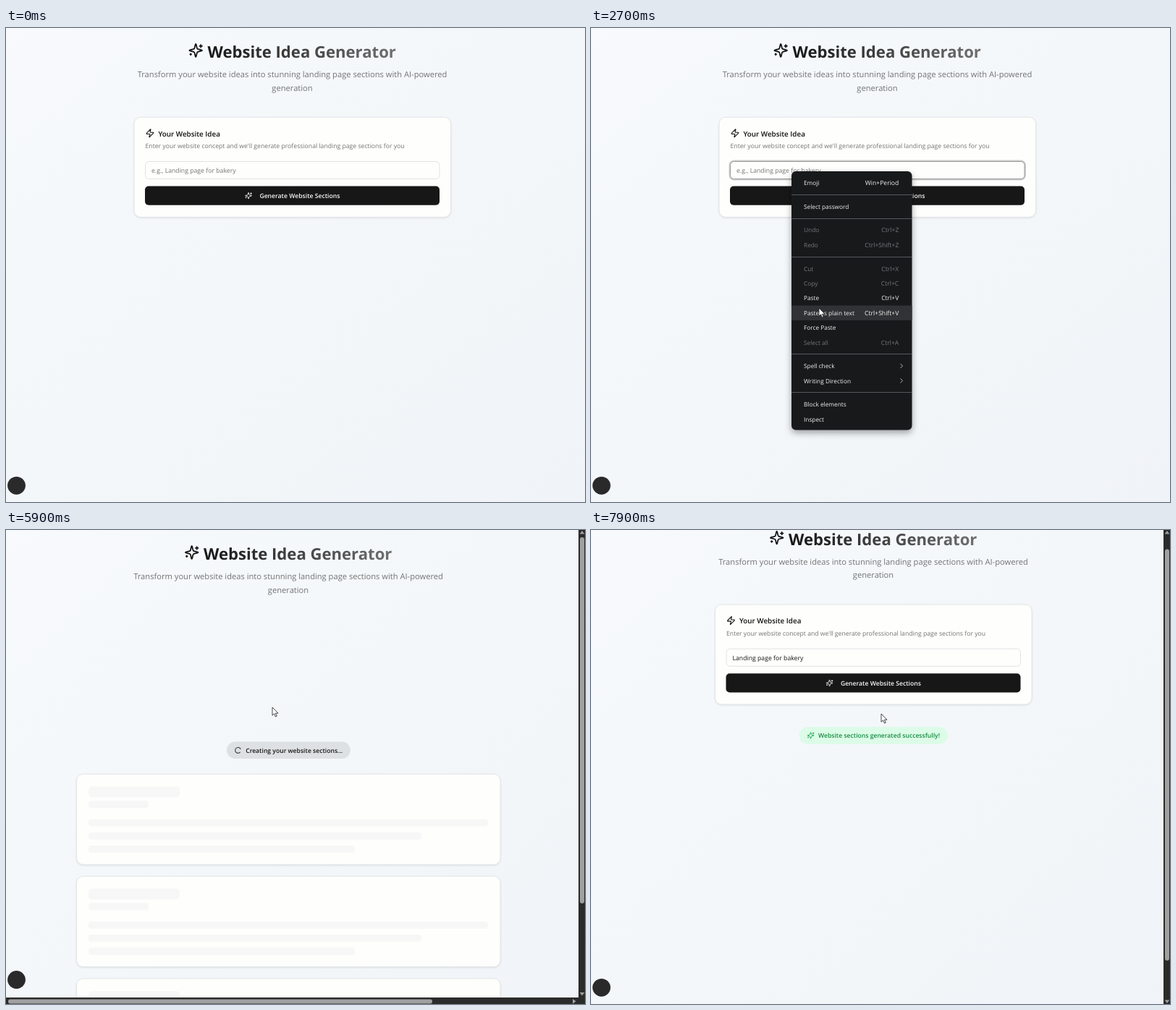
These frames come from a looping animation (800x655 px, 8000 ms). An HTML page:

```html
<!DOCTYPE html>
<html lang="en">
<head>
<meta charset="utf-8">
<title>Website Idea Generator</title>
<style>
  html, body { margin: 0; width: 100%; height: 100%; overflow: hidden; background: #f4f8fb; }
  svg { display: block; width: 100vw; height: 100vh; font-family: "Open Sans", "Noto Sans", sans-serif; }
  text { text-rendering: geometricPrecision; white-space: pre; }
  .icon { fill: none; stroke-width: 2; stroke-linecap: round; stroke-linejoin: round; }
  .card { fill: #fefefd; stroke: #e3e5e6; filter: drop-shadow(0 1px 1px rgba(0, 0, 0, .09)); }
  .menu { fill: #18191b; filter: drop-shadow(0 4px 5px rgba(0, 0, 0, .35)); }
</style>
</head>
<body>
<svg id="stage" viewBox="0 0 800 655" xmlns="http://www.w3.org/2000/svg"></svg>
<script>
const LOOP = 8000, STEP = 100;
const FOCUS = 1700, MENU_OPEN = 1900, PASTE = 3200, LOADING = 4800, DONE = 7500;
const SCROLL_START = 6100, SCROLL_END = 6800, SCROLL_MAX = 138.7;

const SPARKLES = 'M9.937 15.5A2 2 0 0 0 8.5 14.063l-6.135-1.582a.5.5 0 0 1 0-.962L8.5 9.936A2 2 0 0 0 9.937 8.5l1.582-6.135a.5.5 0 0 1 .963 0L14.063 8.5A2 2 0 0 0 15.5 9.937l6.135 1.581a.5.5 0 0 1 0 .964L15.5 14.063a2 2 0 0 0-1.437 1.437l-1.582 6.135a.5.5 0 0 1-.963 0zM20 3v4M22 5h-4M4 17v2M5 18H3';
const ZAP = 'M4 14a1 1 0 0 1-.78-1.63l9.9-10.2a.5.5 0 0 1 .86.46l-1.92 6.02A1 1 0 0 0 13 10h7a1 1 0 0 1 .78 1.63l-9.9 10.2a.5.5 0 0 1-.86-.46l1.92-6.02A1 1 0 0 0 11 14z';

const text = (x, y, size, fill, str, attrs = '') =>
  `<text x="${x}" y="${y}" font-size="${size}" fill="${fill}" ${attrs}>${str}</text>`;
const rect = (x, y, w, h, r, attrs) =>
  `<rect x="${x}" y="${y}" width="${w}" height="${h}" rx="${r}" ${attrs}/>`;
const icon = (x, y, size, path, color) =>
  `<path class="icon" transform="translate(${x} ${y}) scale(${size / 24})" stroke="${color}" d="${path}"/>`;
const SEMI = 'font-weight="600"', MIDDLE = 'text-anchor="middle"';

// Context menu: label, shortcut, enabled; null is a separator.
const MENU = [
  ['Emoji', 'Win+Period', 1], null,
  ['Select password', '', 1], null,
  ['Undo', 'Ctrl+Z', 0], ['Redo', 'Ctrl+Shift+Z', 0], null,
  ['Cut', 'Ctrl+X', 0], ['Copy', 'Ctrl+C', 0], ['Paste', 'Ctrl+V', 1],
  ['Paste as plain text', 'Ctrl+Shift+V', 1], ['Force Paste', '', 1], ['Select all', 'Ctrl+A', 0], null,
  ['Spell check', '›', 1], ['Writing Direction', '›', 1], null,
  ['Block elements', '', 1], ['Inspect', '', 1],
];
const ROW = 20.4, GAP = 12.3;
const menuRows = [];

function buildMenu() {
  let y = 214, out = '';
  for (const item of MENU) {
    if (!item) {
      const line = Math.floor(y - ROW / 2 + GAP / 2) + .5;
      out += `<path d="M277 ${line}h166.5" stroke="#56585b"/>`;
      y += GAP;
      continue;
    }
    const [label, keys, enabled] = item;
    const color = enabled ? '#f1f1f1' : '#76777a';
    out += text(294, y + 3, 8.3, color, label);
    out += keys === '›'
      ? `<path d="M427.5 ${y - 3.2}l3 3-3 3" fill="none" stroke="#b5b6b8"/>`
      : text(425.3, y + 3, 8.6, color, keys, 'text-anchor="end"');
    if (enabled) menuRows.push(y);
    y += ROW;
  }
  return rect(277, 198, 166.5, 357.5, 6, 'class="menu"') +
    rect(277, 0, 166.5, ROW, 0, 'id="menuHover" fill="#313235"') + out;
}

function skeleton(index) {
  const bars = [[17, 126, 15], [37, 83, 10], [62.3, 552, 10], [80.5, 460, 10], [98.6, 368, 10]];
  return `<g transform="translate(97.5 ${337.3 + index * 141.3})">` +
    rect(0, 0, 585.5, 125, 9, 'class="card"') + '<g class="pulse">' +
    bars.map(([y, w, h]) => rect(16.5, y, w, h, h > 12 ? 5 : 4, 'fill="#f2f2f3"')).join('') + '</g></g>';
}

const arrow = (x, y, dir) =>
  `<path transform="translate(${x} ${y}) rotate(${dir})" d="M-3.4 2L0-2.5 3.4 2z" fill="#a0a0a0"/>`;

document.getElementById('stage').innerHTML = `
<defs>
  <linearGradient id="sky" x1="0" y1="0" x2="1" y2="1">
    <stop stop-color="#f8fafd"/><stop offset=".3" stop-color="#f4f8fb"/>
    <stop offset=".65" stop-color="#f2f6f9"/><stop offset="1" stop-color="#f0f3f8"/>
  </linearGradient>
  <linearGradient id="ink" gradientUnits="userSpaceOnUse" x1="279" y1="0" x2="539" y2="0">
    <stop stop-color="#161616"/><stop offset="1" stop-color="#707070"/>
  </linearGradient>
</defs>
<g id="page">
  <rect id="backdrop" width="800" height="655" fill="url(#sky)"/>
  <g id="column">
    ${icon(251.7, 20.5, 21, SPARKLES, '#111')}
    ${text(278.5, 41, 22.1, 'url(#ink)', 'Website Idea Generator', 'font-weight="700"')}
    ${text(395.5, 68.3, 11.15, '#737373', 'Transform your website ideas into stunning landing page sections with AI-powered', MIDDLE)}
    ${text(395.5, 86.6, 11.15, '#737373', 'generation', MIDDLE)}
    <g id="form">
      ${rect(177, 123.3, 437.5, 138, 9, 'class="card"')}
      ${icon(192.4, 138.8, 13.1, ZAP, '#111')}
      ${text(210.4, 149.6, 9.85, '#111', 'Your Website Idea', SEMI)}
      ${text(192.5, 166, 8.67, '#737373', "Enter your website concept and we'll generate professional landing page sections for you")}
      ${rect(191.5, 183.5, 408.5, 26, 6, 'id="ring" fill="none" stroke="#cdcdcd" stroke-width="2"')}
      ${rect(192.5, 184.5, 406.5, 24, 5, 'id="input" fill="#fefefd"')}
      <text id="value" x="201" y="200" font-size="8.7"></text>
      ${rect(192, 218.6, 407, 26.2, 5, 'id="button"')}
      ${icon(329.8, 226.5, 10.5, SPARKLES, '#fafafa')}
      ${text(350.4, 235, 8.63, '#fafafa', 'Generate Website Sections', SEMI)}
    </g>
  </g>
  <g id="loading">
    ${rect(305, 292.6, 170.7, 23.4, 11.7, 'fill="#dee1e3"')}
    <path id="spinner" class="icon" stroke="#3c3c3c" style="stroke-width:2.5" d="M9 0A9 9 0 1 1 2.781-8.56"/>
    ${text(331.2, 307.7, 8.6, '#171717', 'Creating your website sections...', SEMI)}
    ${[0, 1, 2].map(skeleton).join('')}
  </g>
  <g id="success">
    ${rect(287.7, 292.6, 205, 23.4, 11.7, 'fill="#dcfce7"')}
    ${icon(298.3, 299, 10.5, SPARKLES, '#16a34a')}
    ${text(314, 307.8, 8.6, '#168a42', 'Website sections generated successfully!', SEMI)}
  </g>
</g>
<circle id="badge" cx="14.5" r="12.4" fill="#2a2a2b"/>
<g id="bars">
  ${rect(791, 0, 9, 655, 0, 'fill="#2b2b2b"')}
  ${arrow(796, 3.5, 0)}
  ${rect(793, 0, 6, 10, 3, 'id="thumb" fill="#a0a0a0"')}
  <g id="downArrow">${arrow(796, 0, 180)}</g>
  <g id="hbar">
    ${rect(0, 646, 800, 9, 0, 'fill="#2b2b2b"')}
    ${rect(3, 648.5, 586, 6, 3, 'fill="#a0a0a0"')}
    ${arrow(785, 651.3, 90)}
  </g>
</g>
<g id="menu">${buildMenu()}</g>
<path id="arrowCursor" d="M0 0V11.2L2.6 8.8 4.4 13 6.2 12.2 4.4 8.2H8Z" fill="#fff" stroke="#1c1c1c" stroke-width=".8"/>
<g id="beamCursor" fill="none">
  <path d="M-2.5-5.5H-1Q0-5.5 0-4.5V4.5Q0 5.5-1 5.5H-2.5M2.5-5.5H1Q0-5.5 0-4.5V4.5Q0 5.5 1 5.5H2.5" stroke="#111"/>
</g>`;

const ui = {};
document.querySelectorAll('[id]').forEach(el => ui[el.id] = el);
const pulses = document.querySelectorAll('.pulse');

const set = (el, attrs) => { for (const k in attrs) el.setAttribute(k, attrs[k]); };
const show = (el, on) => set(el, { visibility: on ? 'visible' : 'hidden' });
const clamp = v => Math.min(1, Math.max(0, v));
const ease = v => { v = clamp(v); return v * v * (3 - 2 * v); };

// Pointer stops: time, x, y.
const POINTER = [
  [100, 85, 228], [900, 311, 198], [1400, 311, 198], [1700, 277, 198], [1900, 277, 198],
  [2600, 315, 387], [2800, 315, 387], [3000, 313, 376], [3300, 313, 376], [3600, 309, 356],
  [4000, 287, 222], [4400, 325, 232], [4700, 325, 232], [5300, 368, 245], [5900, 368, 245], [6100, 401, 254],
];

function pointerAt(t) {
  const next = POINTER.findIndex(p => p[0] > t);
  if (next < 0) return POINTER[POINTER.length - 1].slice(1);
  if (next === 0) return POINTER[0].slice(1);
  const [t0, x0, y0] = POINTER[next - 1], [t1, x1, y1] = POINTER[next];
  const k = ease((t - t0) / (t1 - t0));
  return [x0 + (x1 - x0) * k, y0 + (y1 - y0) * k];
}

function drawForm(t, x, y, menuOpen) {
  const focused = t >= FOCUS && t < LOADING, filled = t >= PASTE;
  show(ui.ring, focused);
  set(ui.input, { stroke: focused ? '#999' : '#e2e3e4' });
  ui.value.textContent = filled ? 'Landing page for bakery' : 'e.g., Landing page for bakery';
  set(ui.value, { fill: filled ? '#141414' : '#737373' });
  const hover = t > 0 && t < LOADING && !menuOpen && x > 192 && x < 599 && y > 218.5 && y < 245;
  set(ui.button, { fill: hover ? '#2d2d2d' : '#171717' });
}

function drawPointer(t, x, y, menuOpen) {
  const beam = t < LOADING && !menuOpen && x > 192 && x < 599 && y > 184 && y < 209;
  show(ui.arrowCursor, t > 0 && !beam);
  show(ui.beamCursor, t > 0 && beam);
  set(ui.arrowCursor, { transform: `translate(${x} ${y})` });
  set(ui.beamCursor, { transform: `translate(${x + .7} ${y + .3})` });
}

function drawMenu(open, y) {
  show(ui.menu, open);
  const row = menuRows.find(r => Math.abs(r - y) < ROW / 2);
  set(ui.menuHover, { y: (row || 0) - ROW / 2, opacity: row ? 1 : 0 });
}

function drawLoading(t) {
  const age = t - LOADING;
  set(ui.loading, { opacity: clamp((age + 100) / 300) });
  set(ui.spinner, { transform: `translate(320.6 304.4) scale(.4375) rotate(${(age + 25) * .36})` });
  const glow = .75 + .25 * Math.cos((age + 25) / 1000 * Math.PI);
  pulses.forEach(p => set(p, { opacity: glow }));
}

function draw(t) {
  const loading = t >= LOADING && t < DONE, done = t >= DONE;
  const menuOpen = t >= MENU_OPEN && t < PASTE;
  const [x, y] = pointerAt(t);
  const progress = ease((t - SCROLL_START) / (SCROLL_END - SCROLL_START));
  const scroll = done ? 20.3 : loading ? progress * SCROLL_MAX : 0;

  set(ui.page, { transform: `translate(0 ${-scroll})` });
  set(ui.backdrop, { height: loading ? 785 : done ? 737 : 655 });
  set(ui.column, { transform: `translate(${loading || done ? -5.5 : 0} 0)` });
  set(ui.form, { display: loading ? 'none' : 'inline' });
  set(ui.loading, { display: loading ? 'inline' : 'none' });
  show(ui.success, done);
  set(ui.badge, { cy: loading ? 621.5 : 632.3 });

  set(ui.bars, { display: loading || done ? 'inline' : 'none' });
  set(ui.hbar, { display: loading ? 'inline' : 'none' });
  set(ui.thumb, done ? { y: 26.5, height: 568.5 } : { y: 10 + 107 * progress, height: 506 });
  set(ui.downArrow, { transform: `translate(0 ${done ? 651.5 : 641})` });

  if (loading) drawLoading(t);
  drawForm(t, x, y, menuOpen);
  drawMenu(menuOpen, y);
  drawPointer(t, x, y, menuOpen);
}

const start = performance.now();
function tick() {
  const t = (performance.now() - start) % LOOP;
  draw(Math.floor(t / STEP) * STEP);
  requestAnimationFrame(tick);
}
draw(0);
requestAnimationFrame(tick);
</script>
</body>
</html>
```
